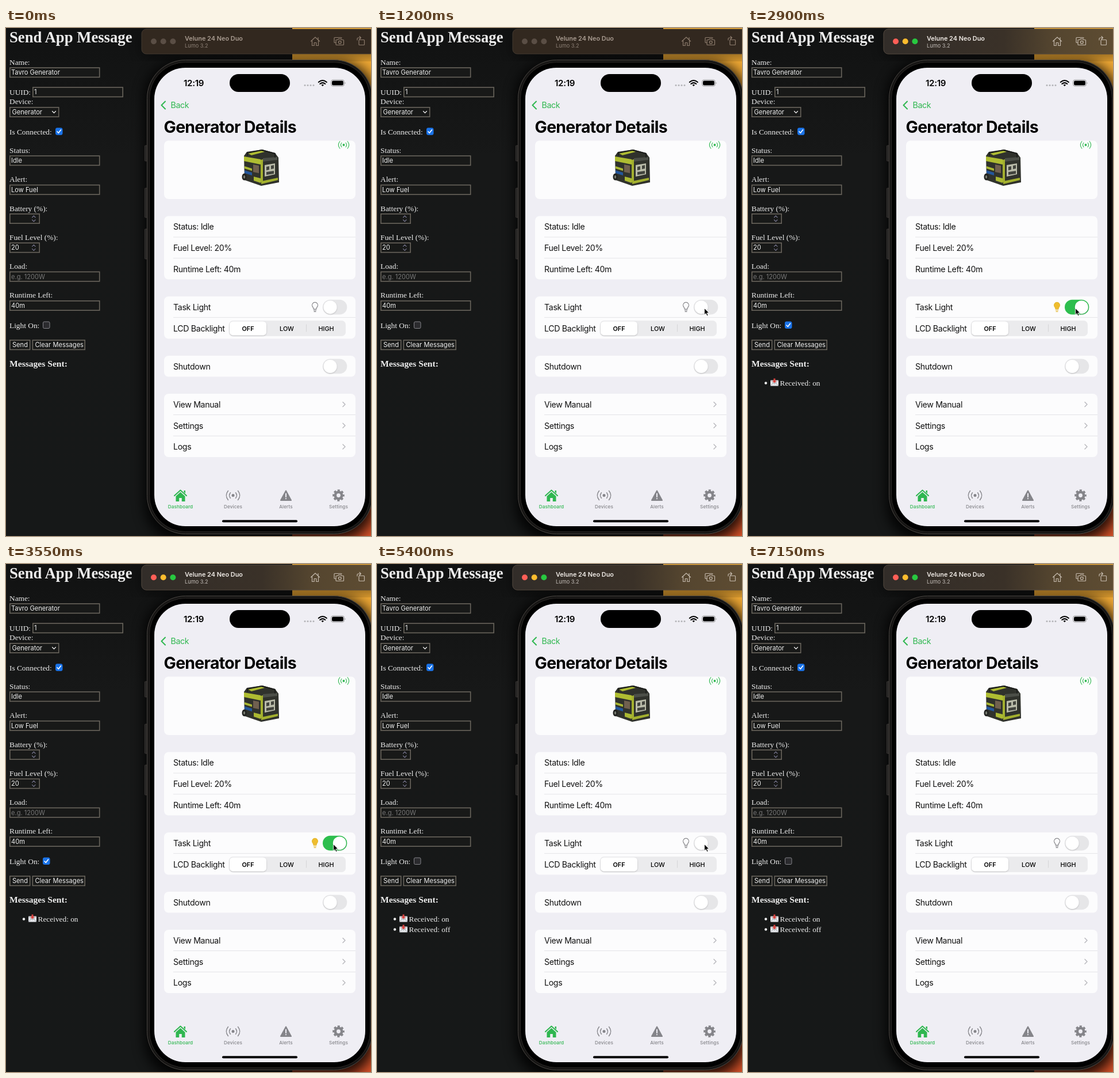
An HTML page that plays this animation: 635x882 px, repeating every 7200 ms.

```html
<!DOCTYPE html>
<html lang="en">
<head>
<meta charset="utf-8">
<title>Device message demo</title>
<style>
html, body { margin: 0; height: 100%; overflow: hidden; background: #151616; }
svg { display: block; width: 100%; height: 100%; }
text { font: 14.2px Inter, "Liberation Sans", sans-serif; letter-spacing: -.024em; white-space: pre; }
.web text { font: 13.35px "Liberation Serif", "Times New Roman", serif; letter-spacing: 0; fill: #ededed; }
.web .h1 { font-size: 26.7px; font-weight: bold; }
.web .h3 { font-size: 15.6px; font-weight: bold; }
.web .field { font: 11.1px Inter, "Liberation Sans", sans-serif; fill: #f2f2f2; }
.web .hint { fill: #777; }
.title { font-size: 28.4px; font-weight: 700; letter-spacing: -.024em; }
.seg { font-size: 10.8px; font-weight: 500; letter-spacing: 0; text-anchor: middle; }
.tab { font-size: 8.2px; font-weight: 500; letter-spacing: .01em; text-anchor: middle; }
.line { fill: none; stroke-linecap: round; stroke-linejoin: round; }
</style>
</head>
<body>
<svg viewBox="0 0 635 882" preserveAspectRatio="none">
  <defs>
    <linearGradient id="sky" x2="0" y2="1">
      <stop stop-color="#efac35"/><stop offset=".5" stop-color="#e58a2c"/><stop offset="1" stop-color="#d9532a"/>
    </linearGradient>
    <linearGradient id="bar">
      <stop stop-color="#322d29"/><stop offset=".5" stop-color="#3a3128"/><stop offset=".7" stop-color="#54452f"/><stop offset="1" stop-color="#604e33"/>
    </linearGradient>
    <linearGradient id="page" x2="0" y2="1">
      <stop stop-color="#111212"/><stop offset=".25" stop-color="#171818"/><stop offset="1" stop-color="#161818"/>
    </linearGradient>
    <filter id="blur" x="-20%" y="-20%" width="140%" height="140%"><feGaussianBlur stdDeviation="11"/></filter>
    <filter id="soft" x="-50%" y="-50%" width="200%" height="200%"><feDropShadow dx="0" dy="1" stdDeviation="1" flood-opacity=".22"/></filter>
    <g id="waves" class="line" stroke="currentColor" stroke-width="1.4">
      <circle r="1.8" fill="currentColor"/>
      <path d="M4.5-4.8Q8.500 0 4.5 4.8M8.5-8Q15 0 8.5 8M-4.5-4.8Q-8.5 0-4.5 4.8M-8.5-8Q-15 0-8.5 8"/>
    </g>
    <g id="mail">
      <circle cx="31" cy="616.500" r="2.2" fill="#ededed"/>
      <rect x="39" y="611.5" width="14" height="10" rx="1" fill="#e4e6ea"/>
      <path d="M39 621l5-5M53 621l-5-5M39.5 612l6.5 6 6.5-6" class="line" stroke="#9ba0a8" stroke-width=".9"/>
      <path d="M44.5 608.5h3v4h2.5l-4 4-4-4h2.5z" fill="#d8423e"/>
    </g>
  </defs>

  <rect width="635" height="882" fill="url(#page)"/>
  <g class="web" id="web"></g>
  <g class="web" id="sent1"><use href="#mail"/><text x="55.5" y="620.5">Received: on</text></g>
  <g class="web" id="sent2" transform="translate(0 18)"><use href="#mail"/><text x="55.5" y="620.5">Received: off</text></g>

  <!-- simulator window -->
  <rect x="498" width="137" height="882" fill="url(#sky)"/>
  <rect x="241" y="58" width="401" height="832" rx="62" filter="url(#blur)" opacity=".85"/>
  <rect x="236" y="10" width="420" height="40" rx="8" filter="url(#blur)" opacity=".45"/>
  <rect x="236" y="2" width="420" height="43" rx="8" fill="#32281f" stroke="#4b4037" stroke-width=".8"/>
  <rect id="active" x="236" y="2" width="420" height="43" rx="8" fill="url(#bar)" stroke="#554a40" stroke-width=".8"/>
  <g id="lights"><circle cx="257" cy="23.2" r="5"/><circle cx="273.7" cy="23.2" r="5"/><circle cx="290.4" cy="23.2" r="5"/></g>
  <g id="caption">
    <text x="311" y="21.5" style="font-size:10.9px;font-weight:600;letter-spacing:0">Velune 24 Neo Duo</text>
    <text x="311" y="33.5" style="font-size:9.2px;letter-spacing:0" opacity=".75">Lumo 3.2</text>
  </g>
  <g id="tools" class="line" stroke-width="1.2">
    <path d="M530.5 23l7.5-7 7.5 7M532.5 22v8.5h3.7v-5h3.6v5h3.7V22M543 20v-3.5"/>
    <path d="M573.5 25.5H572q-1 0-1-1v-7q0-1 1-1h11q1 0 1 1M575 20.5h2.2l1.2-1.6h4.4l1.2 1.6h2.5q1 0 1 1v7q0 1-1 1H575q-1 0-1-1v-7q0-1 1-1z"/>
    <circle cx="580.8" cy="24.7" r="2.4"/>
    <path d="M615 20.5h7.5q1 0 1 1v7q0 1-1 1H615q-1 0-1-1v-7q0-1 1-1zM611 21v-2q0-2 2-2h4M615 14.5l2.5 2.5-2.5 2.5"/>
  </g>

  <!-- phone shell -->
  <g fill="#252423" stroke="#45413e" stroke-width=".7">
    <rect x="241.5" y="204" width="5" height="27" rx="1"/><rect x="241.5" y="278" width="5" height="51" rx="1"/><rect x="241.5" y="349" width="5" height="52" rx="1"/>
  </g>
  <rect x="245.5" y="55.5" width="392" height="823" rx="67" fill="#161514" stroke="#4a4642"/>
  <rect x="249.5" y="59.5" width="384" height="815" rx="63" stroke="#35322f" stroke-width=".8"/>
  <rect x="258" y="69" width="367" height="796" rx="54" fill="#efeef4"/>
  <rect x="389" y="80" width="105" height="31" rx="15.5"/>
  <text x="309" y="101.3" style="font-size:15.2px;font-weight:600">12:19</text>
  <g fill="#b4b4b8"><circle cx="520" cy="99.5" r="1.5"/><circle cx="525" cy="99.5" r="1.5"/><circle cx="530" cy="99.5" r="1.5"/><circle cx="535" cy="99.5" r="1.5"/></g>
  <path d="M543.8 94q7-6 14 0M546.3 97q4.500-3.8 9 0" class="line" stroke="#000" stroke-width="2.1"/>
  <path d="M548.5 98.800q2.3-1.7 4.6 0l-2.3 2.5z"/>
  <rect x="565.5" y="90" width="23" height="11" rx="3.5" fill="none" stroke="#999"/>
  <rect x="567" y="91.5" width="20" height="8" rx="2.2"/>
  <path d="M589.6 93.7q2 1.8 0 3.6z" fill="#999"/>

  <g fill="#2fb750">
    <path d="M277 127.5l-6.5 6.500 6.5 6.5" class="line" stroke="#2fb750" stroke-width="2.1"/>
    <text x="286.5" y="139">Back</text>
  </g>
  <text x="274.5" y="182" class="title">Generator Details</text>
  <g id="cards" fill="#fcfcfd"></g>
  <use href="#waves" transform="translate(587.5 203) scale(.78)" color="#2fb750"/>

  <!-- machine -->
  <g>
    <path d="M414 222l5-7 27-4 22 6 6 8 1 43-31 6-29-10z" fill="#30322c"/>
    <path d="M414 223l29 5v9l-29-6zM420 217l24-4 6 2-23 6z" fill="#afbd32"/>
    <path d="M415 240l13 4v4l-13-4zM431 258l12 3v8l-12-4z" fill="#aab832"/>
    <path d="M447 226l25-2v5l-25 3z" fill="#4c4f48"/>
    <path d="M444 266l29-6v4l-29 7zM443 229l4-1v38l-4 2z" fill="#a3b02e"/>
    <path d="M430 237l10 2v13l-10-2z" fill="#70604f"/>
    <path d="M415 247l13 4v5l-13-4z" fill="#24569b"/>
    <path d="M450 238l18-3v19l-18 4z" fill="#b9bba9"/>
    <path d="M453 241l5-1v6l-5 1zM461 239l5-1v6l-5 1zM453 250l13-2v5l-13 2z" fill="#41433d"/>
    <path d="M420 221v-4l25-5 23 6v6" class="line" stroke="#1d1e1c" stroke-width="2"/>
    <ellipse cx="414.5" cy="258.5" rx="4" ry="6" fill="#20211f"/><ellipse cx="414.5" cy="258.5" rx="1.7" ry="2.8" fill="#777b70"/>
  </g>

  <g id="rows" fill="#111"></g>
  <g id="bulb" class="line">
    <path d="M535 488q0-2-1.3-3.7a4.9 4.9 0 1 1 7.600 0Q540 486 540 488z" stroke-width="1.1"/>
    <path d="M535.3 490h4.4M536 492.3h3" stroke-width="1.2"/>
  </g>
  <rect id="track" x="551" y="471.8" width="42.3" height="25.8" rx="12.9"/>
  <circle id="knob" cy="484.7" r="11.5" fill="#fff" filter="url(#soft)"/>
  <rect x="551" y="574.5" width="42.3" height="25.8" rx="12.9" fill="#e6e6e8"/>
  <circle cx="564" cy="587.4" r="11.5" fill="#fff" filter="url(#soft)"/>
  <rect x="388" y="508" width="203" height="27" rx="7" fill="#ebebed"/>
  <rect x="389" y="509.5" width="64" height="24" rx="6" fill="#fff" filter="url(#soft)"/>
  <path d="M522.5 514.5v13" stroke="#d5d5d8"/>
  <text x="421" y="525.5" class="seg" style="font-weight:600">OFF</text>
  <text x="488.5" y="525.5" class="seg">LOW</text>
  <text x="557" y="525.5" class="seg">HIGH</text>

  <!-- tab bar -->
  <g fill="#2fb750">
    <path d="M293 812l10.500-9.500L314 812" class="line" stroke="#2fb750" stroke-width="2"/>
    <path d="M295.5 813l8-7.200 8 7.200v9h-5.700v-6h-4.600v6h-5.700zM309.500 803h2.500v5l-2.500-2.200z"/>
    <text x="303.5" y="833.5" class="tab">Dashboard</text>
  </g>
  <g fill="#85858a" color="#85858a">
    <use href="#waves" x="395" y="811.5"/>
    <path d="M487 803.5l9 16.5h-18z" stroke="#85858a" stroke-width="2" stroke-linejoin="round"/>
    <path d="M487 808.5v5.500M487 817v.3" class="line" stroke="#efeef4" stroke-width="2"/>
    <circle cx="578.5" cy="811.5" r="5.7" fill="none" stroke="#85858a" stroke-width="4.6"/>
    <circle cx="578.5" cy="811.5" r="8.8" fill="none" stroke="#85858a" stroke-width="3" stroke-dasharray="4 2.912" stroke-dashoffset="2"/>
    <text x="395" y="833.5" class="tab">Devices</text>
    <text x="487" y="833.5" class="tab">Alerts</text>
    <text x="578.5" y="833.5" class="tab">Settings</text>
  </g>
  <rect x="376" y="854.3" width="131" height="4" rx="2"/>
  <path id="cursor" d="M0 0v11.5l2.7-2.5 1.9 4.3 2-.9-1.9-4.1h3.7z" fill="#000" stroke="#fff" stroke-width=".9"/>
</svg>
<script>
const $ = id => document.getElementById(id);
const label = (x, y, s, c = '') => `<text x="${x}" y="${y}" class="${c}">${s}</text>`;
const box = (x, y, w, s = '', c = '', pad = 3) =>
  `<rect x="${x + .8}" y="${y + .8}" width="${w - 1.6}" height="16.4" fill="#181918" stroke="#69645c" stroke-width="1.6"/>` +
  label(x + pad, y + 13, s, 'field ' + c);
const spin = y => `<path d="M45.5 ${y - 2}l2.8-3 2.8 3M45.5 ${y + 2}l2.8 3 2.8-3" class="line" stroke="#77768f" stroke-width="1.1"/>`;
const check = (id, x, y) => `<g id="${id}" transform="translate(${x} ${y})"><rect width="11.5" height="11.5" rx="2"/>` +
  `<path d="M2.5 6l2.3 2.5L9 3" class="line" stroke="#fff" stroke-width="1.6"/></g>`;

$('web').innerHTML =
  label(6, 24.5, 'Send App Message', 'h1') +
  [['Name:', 63.5], ['UUID:', 115.5], ['Device:', 132], ['Is Connected:', 184.5], ['Status:', 216.5],
   ['Alert:', 267], ['Battery (%):', 317.5], ['Fuel Level (%):', 367.5], ['Load:', 417.5],
   ['Runtime Left:', 468], ['Light On:', 520.5]].map(([s, y]) => label(6, y, s)).join('') +
  box(6, 68.2, 157.5, 'Tavro Generator') + box(46, 102.3, 158, '1') + box(6, 137, 86.5, 'Generator', '', 4.5) +
  box(6, 221.2, 157.5, 'Idle') + box(6, 271.8, 157.5, 'Low Fuel') +
  box(6, 322, 53) + spin(331) + box(6, 372.4, 53, '20') + spin(381.4) +
  box(6, 422.6, 157.5, 'e.g. 1200W', 'hint') + box(6, 473, 157.5, '40m') +
  box(6, 541.2, 36.5, 'Send', '', 5) + box(45.5, 541.2, 92.5, 'Clear Messages', '', 5) +
  '<path d="M80.5 144.5l3 3 3-3" class="line" stroke="#eee" stroke-width="1.2"/>' +
  check('linked', 86.5, 173.8) + check('lit', 64.5, 510) +
  label(6, 587.5, 'Messages Sent:', 'h3');

$('cards').innerHTML = [[195.5, 101.5], [326.5, 110], [466, 73.5], [569, 36.5], [635, 110]]
  .map(([y, h]) => `<rect x="275" y="${y}" width="333" height="${h}" rx="8"/>`).join('');

$('rows').innerHTML =
  [['Status: Idle', 350], ['Fuel Level: 20%', 387], ['Runtime Left: 40m', 423.7], ['Task Light', 489.8],
   ['LCD Backlight', 526.5], ['Shutdown', 592.7], ['View Manual', 658.7], ['Settings', 695.5], ['Logs', 732.2]]
    .map(([s, y]) => label(291, y, s)).join('') +
  [363, 399.7, 502.6, 671.5, 708.3].map(y => `<path d="M291 ${y}h317" stroke="#dedee2" stroke-width=".8"/>`).join('') +
  [653.5, 690.3, 727].map(y => `<path d="M586 ${y - 4}l4 4-4 4" class="line" stroke="#b9b9be" stroke-width="1.5"/>`).join('');

const LOOP = 7200, FOCUS = 1600, ON = 2350, OFF = 4050;
const clamp = v => Math.min(1, Math.max(0, v));
const easeOut = v => 1 - (1 - v) ** 2;
const smooth = v => v * v * (3 - 2 * v);
const mix = (a, b, k) => `rgb(${a.map((v, i) => v + (b[i] - v) * k)})`;
const show = (id, on) => $(id).style.display = on ? '' : 'none';

function setCheck(id, on) {
  const [square, tick] = $(id).children;
  square.setAttribute('fill', on ? '#1a73e8' : '#2b2b2e');
  square.setAttribute('stroke', on ? '#1a73e8' : '#85858a');
  tick.style.display = on ? '' : 'none';
}

function draw(t) {
  const focused = t >= FOCUS, lit = t >= ON + 100 && t < OFF + 100;
  show('active', focused);
  [...$('lights').children].forEach((dot, i) =>
    dot.setAttribute('fill', focused ? ['#fe5f57', '#febc2e', '#28c840'][i] : '#5a4e45'));
  $('caption').setAttribute('fill', focused ? '#f0ebe6' : '#a99c91');
  $('tools').setAttribute('stroke', focused ? '#c3b8ab' : '#8c7b6c');

  const slide = easeOut(clamp((t - ON) / 300)) - easeOut(clamp((t - OFF) / 300));
  const tint = clamp((t - ON) / 300) - clamp((t - OFF) / 450);
  $('knob').setAttribute('cx', 564 + 16.3 * slide);
  $('track').setAttribute('fill', mix([230, 230, 232], [45, 190, 78], tint));
  $('bulb').setAttribute('stroke', lit ? '#e3b62d' : '#77777b');
  $('bulb').firstElementChild.setAttribute('fill', lit ? '#efbd2e' : 'none');

  setCheck('linked', true);
  setCheck('lit', lit);
  show('sent1', t >= ON + 100);
  show('sent2', t >= OFF + 100);

  const away = 1 - smooth(clamp((t - 750) / 400)) + smooth(clamp((t - 6000) / 450));
  show('cursor', away < 1);
  $('cursor').setAttribute('transform', `translate(${569.5 + 70 * away} ${486.5 + 60 * away})`);
}

const start = performance.now();
(function tick() {
  draw((performance.now() - start) % LOOP);
  requestAnimationFrame(tick);
})();
</script>
</body>
</html>
```
